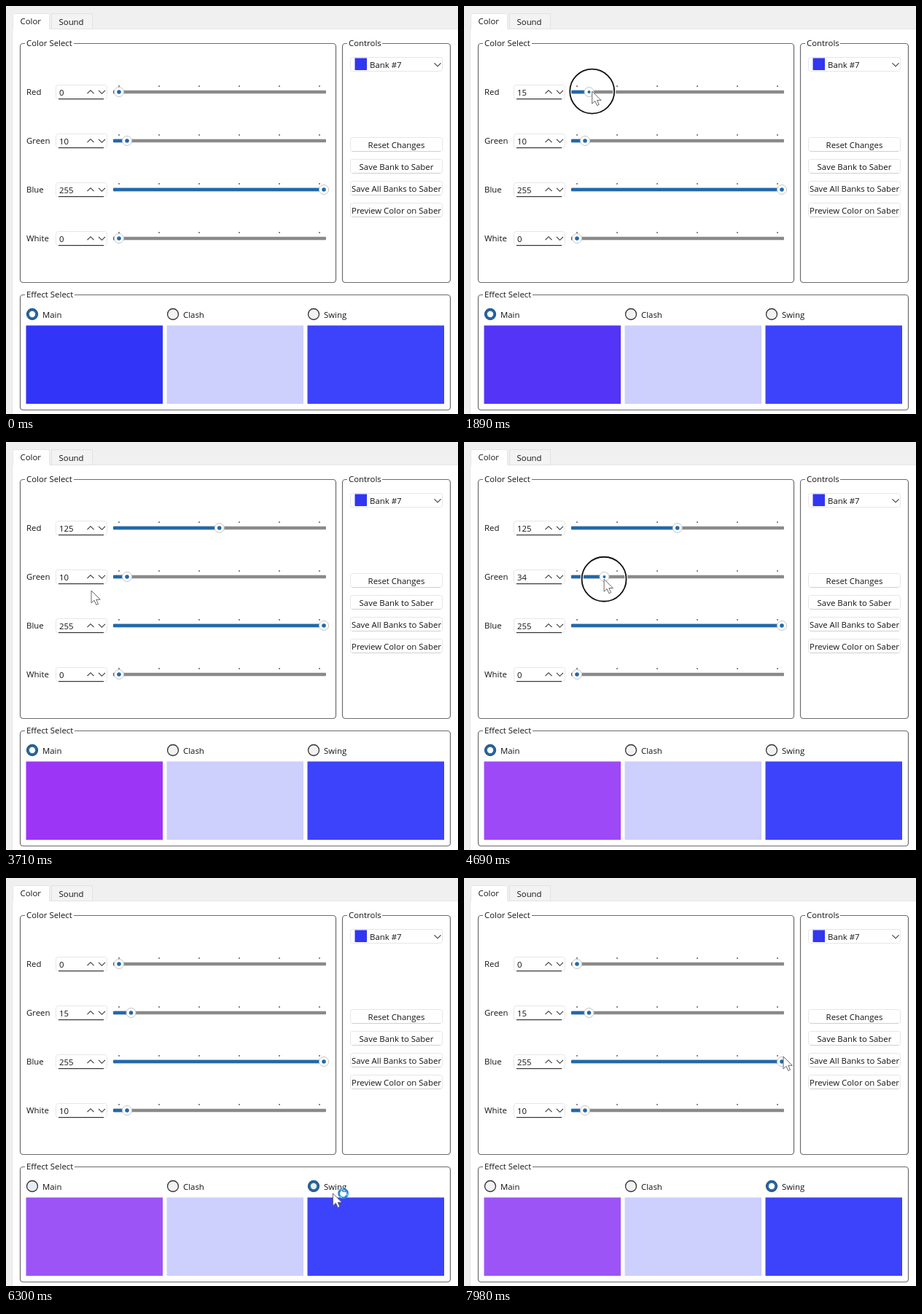
An HTML page for the animation above (8 s loop, 620 px wide and 560 px high).

```html
<!DOCTYPE html>
<html lang="en">
<head>
<meta charset="utf-8">
<title>Color panel</title>
<style>
html, body { margin: 0; width: 100%; height: 100%; overflow: hidden; background: #f0f0f0; }
svg { display: block; width: 620px; height: 560px; }
text { font: 11.4px "Open Sans", "Noto Sans", sans-serif; fill: #141414; }
.mid { text-anchor: middle; }
.box { fill: #fff; stroke: #e6e6e6; }
.frame { fill: none; stroke: #6b6b6b; stroke-width: 1.2; }
.chev { fill: none; stroke: #333; stroke-width: 1.1; }
.blue { fill: #2069ab; }
</style>
</head>
<body>
<svg id="stage" viewBox="0 0 620 560"></svg>
<script>
const LOOP = 8000, STEP = 70;
const stage = document.getElementById('stage');

function set(el, attrs) {
  for (const k in attrs) el.setAttribute(k, attrs[k]);
}
function add(tag, attrs, parent = stage) {
  const el = document.createElementNS('http://www.w3.org/2000/svg', tag);
  set(el, attrs);
  parent.appendChild(el);
  return el;
}
function rect(x, y, width, height, attrs) {
  return add('rect', { x, y, width, height, ...attrs });
}
function disc(cx, cy, r, attrs, parent) {
  return add('circle', { cx, cy, r, ...attrs }, parent);
}
function label(x, y, str, attrs) {
  const el = add('text', { x, y, ...attrs });
  el.textContent = str;
  return el;
}
function chevron(x, y, dir) {
  add('path', { d: `M${x - 4.5} ${y - 2.2 * dir}l4.5 ${4.5 * dir}l4.5 ${-4.5 * dir}`, class: 'chev' });
}
function group(x, y, w, h, title, gap) {
  rect(x, y, w, h, { rx: 4, class: 'frame' });
  rect(x + 6.5, y - 3, gap, 6, { fill: '#fff' });
  label(x + 8.5, y + 3.5, title);
}

// Window and tabs
rect(8.5, 31.5, 620, 540, { rx: 3, class: 'box' });
rect(62.5, 10.5, 56, 21, { fill: '#f3f3f3', stroke: '#e2e2e2' });
rect(9.5, 10.5, 50, 22, { rx: 2, class: 'box' });
rect(10, 30, 49, 4, { fill: '#fff' });
label(19.5, 25, 'Color');
label(72.5, 26, 'Sound');

group(19.5, 51.5, 433, 328, 'Color Select', 67);
group(461.5, 51.5, 148, 328, 'Controls', 48);
group(19.5, 396.5, 590, 158, 'Effect Select', 68);

// Controls
rect(472.5, 70.5, 126, 19, { rx: 3, class: 'box' });
rect(478.5, 71.5, 16.5, 16.5, { fill: '#3136f0' });
label(499, 85, 'Bank #7');
chevron(592, 80.5, 1);
['Reset Changes', 'Save Bank to Saber', 'Save All Banks to Saber', 'Preview Color on Saber'].forEach((s, i) => {
  const y = 180.5 + 30 * i;
  rect(472.5, y, 126, 19, { rx: 3, class: 'box' });
  add('path', { d: `M475 ${y + 19}h121`, stroke: '#cfcfcf' });
  label(535.5, y + 14.5, s, { class: 'mid' });
});

// Sliders
const sliders = ['Red', 'Green', 'Blue', 'White'].map((name, i) => {
  const y = 118 + 67 * i;
  label(28, y + 4.2, name);
  rect(68.5, y - 9.5, 70, 19, { rx: 3, class: 'box' });
  rect(72, y + 9, 62, 1.2, { fill: '#333' });
  chevron(116, y, -1);
  chevron(131.5, y, 1);
  for (let n = 0; n < 6; n++) rect(154 + 55 * n, y - 9, 2, 2, { fill: '#8a8a8a' });
  rect(147, y - 2.2, 292, 4.4, { rx: 1, fill: '#8a8a8a' });
  const fill = rect(147, y - 2.2, 10, 4.4, { rx: 1, class: 'blue' });
  const knob = disc(0, y, 6.5, { fill: '#fff', stroke: '#c4c4c4' });
  const dot = disc(0, y, 3, { class: 'blue' });
  const text = label(73, y + 4.5, '');
  return (v, held) => {
    const x = 155 + v * 281 / 255;
    set(fill, { width: x - 147 });
    set(knob, { cx: x });
    set(dot, { cx: x, r: held ? 2 : 2.8 });
    text.textContent = v;
  };
});

// Effects
const effects = ['Main', 'Clash', 'Swing'].map((name, i) => {
  const x = 28 + 193 * i;
  const ring = disc(x + 8, 423, 7.5, { 'stroke-width': 1.3 });
  const hole = disc(x + 8, 423, 4.2);
  label(x + 22, 428, name);
  const swatch = rect(x - 0.5, 438.5, 187.5, 107.5, { fill: ['', '#cdcffd', '#3d43fa'][i] });
  return { swatch, mark(on, soft) {
    set(ring, { fill: on ? '#2567a3' : soft ? '#e6edf3' : '#f2f2f2', stroke: on ? '#2a577f' : '#333' });
    set(hole, { fill: on ? soft ? '#e8edf2' : '#fff' : 'none' });
  } };
});

// Pointer with press halo and busy ring
const pointer = add('g', {});
const halo = add('g', {}, pointer);
disc(0, 0, 30.5, { fill: 'none', stroke: '#fff', 'stroke-width': 4 }, halo);
disc(0, 0, 30.5, { fill: 'none', stroke: '#111', 'stroke-width': 1.8 }, halo);
const arrow = add('path', {
  d: 'M0 0V17L4 13.3L6.8 19.5L9.5 18.3L6.8 12.3H12.3Z', 'stroke-linejoin': 'round'
}, pointer);
const busy = add('g', {}, pointer);
disc(0, 0, 6, { fill: 'none', stroke: '#2a8bd2', 'stroke-width': 3 }, busy);
disc(0, 0, 6, { fill: 'none', stroke: '#79cdf2', 'stroke-width': 1.6, 'stroke-dasharray': '4 8.57' }, busy);

const smooth = p => p * p * (3 - 2 * p);
const speedUp = p => p * p;
const linear = p => p;

// Stops of the pointer: time, place, easing of the way there
const stops = [
  [420, 315, 442],
  [1190, 160, 117, smooth],
  [1330, 160, 115, linear],
  [2520, 231, 124.5, speedUp],
  [2940, 287, 124.5, linear],
  [3290, 293, 124.5, linear],
  [3710, 117, 204, smooth],
  [4200, 166, 187, smooth],
  [4970, 207, 189, linear],
  [5530, 497, 541, smooth],
  [6160, 449, 424, smooth],
  [6650, 446, 469, smooth],
  [7700, 438, 245, smooth]
];

function place(t) {
  const i = stops.findIndex(s => s[0] > t);
  if (i < 1) return stops[i ? stops.length - 1 : 0].slice(1, 3);
  const [t0, x0, y0] = stops[i - 1], [t1, x1, y1, ease] = stops[i];
  const p = ease((t - t0) / (t1 - t0));
  return [x0 + (x1 - x0) * p, y0 + (y1 - y0) * p];
}

// A slider follows the pointer while it is held
function dragged(t, from, to, low, high) {
  const x0 = place(from)[0], x1 = place(to)[0];
  const x = place(Math.min(to, Math.max(from, t)))[0];
  return Math.round(low + (high - low) * (x - x0) / (x1 - x0));
}
const within = (t, a, b) => t >= a && t < b;
const show = (el, on) => set(el, { visibility: on ? 'visible' : 'hidden' });

function draw(t) {
  const swing = t >= 6230, fade = within(t, 6230, 6440);
  const holdRed = within(t, 1330, 3360), holdGreen = within(t, 4200, 5040);
  const red = dragged(t, 1330, 3290, 0, 125);
  const green = dragged(t, 4200, 4970, 10, 47);
  sliders[0](swing ? 0 : red, holdRed);
  sliders[1](swing ? 15 : green, holdGreen);
  sliders[2](255);
  sliders[3](swing ? 10 : 0);

  set(effects[0].swatch, { fill: `rgb(${50 + 7.6 * red ** 0.548},${44.5 + 0.84 * green},247)` });
  effects[0].mark(!swing, fade);
  effects[1].mark(false);
  effects[2].mark(swing, fade);

  const [x, y] = place(t);
  set(pointer, { transform: `translate(${x} ${y})`, display: t < 420 ? 'none' : 'inline' });
  set(arrow, t < 1330
    ? { fill: '#111', stroke: '#fff', 'stroke-width': 0.8, transform: 'scale(.88)' }
    : { fill: '#fff', stroke: '#555', 'stroke-width': 0.9, transform: 'scale(1)' });
  show(halo, holdRed || holdGreen || within(t, 6160, 6230));
  show(busy, within(t, 5320, 6510));
  set(busy, { transform: `translate(14.2 0) rotate(${t * 0.36})` });
}

const start = performance.now();
function tick(now) {
  const t = Math.max(0, now - start) % LOOP;
  draw(Math.floor(t / STEP) * STEP);
  requestAnimationFrame(tick);
}
draw(0);
requestAnimationFrame(tick);
</script>
</body>
</html>
```
